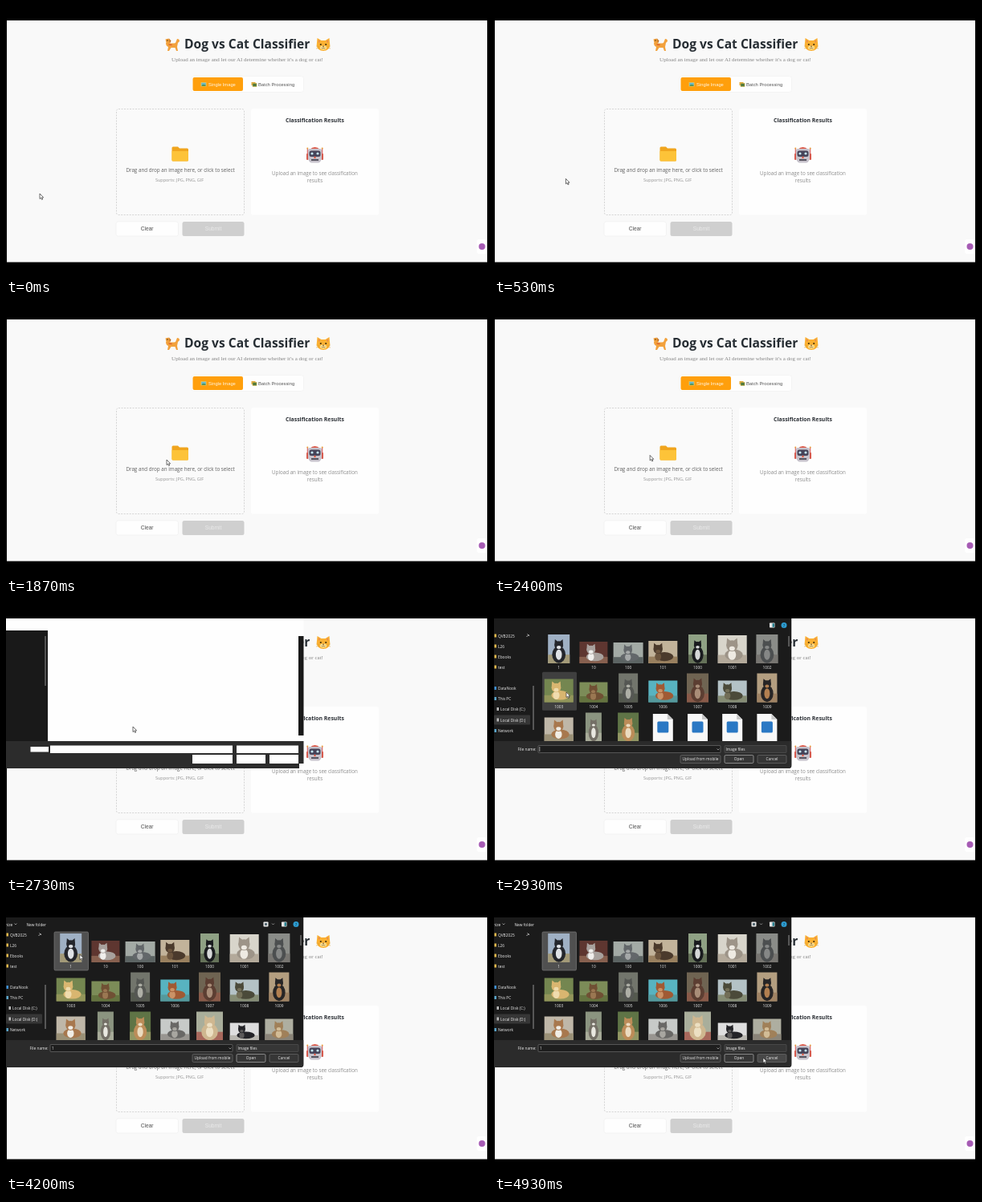
Write an HTML page that moves like this. It is 600 by 338 pixels and loops after 5 s.

```html
<!DOCTYPE html>
<html lang="en">
<head>
<meta charset="utf-8">
<title>Classifier demo</title>
<style>
html, body { margin: 0; width: 100%; height: 100%; overflow: hidden; background: #000; }
svg { display: block; width: 100vw; height: 100vh; }
text { font-family: "Open Sans", "Noto Sans", sans-serif; }
.arial { font-family: "Liberation Sans", Arial, sans-serif; }
.times { font-family: "Liberation Serif", Times, serif; }
.mid { text-anchor: middle; }
.bold { font-weight: 700; }
.ui { font-size: 4.8px; fill: #ececec; }
</style>
</head>
<body>
<svg id="stage" viewBox="0 0 600 338">
  <defs>
    <clipPath id="files"><rect x="52" y="33" width="312" height="138"/></clipPath>
    <clipPath id="dialogBox"><path d="M0 18H370.500V201q0 4-4 4H0z"/></clipPath>
  </defs>

  <rect width="600" height="338" fill="#000"/>
  <rect x="1" y="18" width="598" height="301.500" fill="#f9f9f9"/>

  <g id="page">
    <g id="dog" fill="#f2a13c">
      <path d="M202 46q6 1 9 0l2-5q3 0 3 3l-2 2-1 5 1 5h-2l-1.500-4h-5l-2.500 4h-2l1-5q-3-1-3-5z"/>
      <path d="M198.500 41.500l4-1 2 3-1 4-4-1.500z"/>
      <path d="M203 40.500l2.500 3-1.500 3z" fill="#b96b22"/>
      <circle cx="201" cy="43" r=".7" fill="#33230a"/>
      <path d="M202.500 48l4 .5" stroke="#d44a2c" stroke-width="1.200"/>
    </g>
    <text class="bold" x="222" y="53" font-size="15.600" fill="#262d33">Dog vs Cat Classifier</text>
    <g id="cat">
      <path d="M387.500 40l5 3h5l5-3 .8 9q-1 7-8.300 7t-8.300-7z" fill="#fbb133"/>
      <path d="M388.700 42l2.500 2-2 2zM401.300 42l-2.500 2 2 2z" fill="#e88a52"/>
      <circle cx="391.800" cy="48" r="1.100" fill="#42310d"/><circle cx="398.200" cy="48" r="1.100" fill="#42310d"/>
      <ellipse cx="395" cy="52" rx="4" ry="2.500" fill="#ffe598"/>
      <path d="M394 50h2l-1 1.200zM392.500 52.200q1.300 1.500 2.500 0 1.200 1.500 2.500 0" fill="none" stroke="#704514" stroke-width=".6"/>
      <path d="M386 50l4 .7M386 53l4-.8M404 50l-4 .7M404 53l-4-.8" stroke="#d69a24" stroke-width=".5"/>
    </g>
    <text class="times mid" x="300.500" y="68.500" font-size="7" fill="#858585">Upload an image and let our AI determine whether it's a dog or cat!</text>

    <rect x="231" y="87.500" width="139.500" height="20" rx="3" fill="#fefefe" stroke="#f0f0f0" stroke-width=".6"/>
    <rect x="232.500" y="89" width="62.500" height="17" rx="2" fill="#ff9f0c"/>
    <g id="picture">
      <rect x="242.500" y="95" width="7" height="5.500" rx=".6" fill="#e7c35a"/>
      <rect x="243.300" y="95.800" width="5.400" height="3.900" fill="#69b9c9"/>
      <path d="M243.300 99.700l2-2 1.500 1 1-1 .9 2z" fill="#4f8a3c"/>
    </g>
    <text class="arial" x="252" y="100" font-size="5.800" fill="#fff5e3">Single Image</text>
    <g id="pictures">
      <rect x="305.500" y="95" width="5" height="4" fill="#e0a83c"/>
      <rect x="307" y="96.500" width="5" height="4" fill="#4f7a3d" stroke="#d7b64d" stroke-width=".6"/>
    </g>
    <text class="arial" x="314" y="100" font-size="5.800" fill="#555">Batch Processing</text>

    <rect x="137.500" y="128.500" width="159" height="132" rx="2.500" fill="#fafafa" stroke="#ccc" stroke-width=".8" stroke-dasharray="2 1.500"/>
    <path d="M206.500 177q0-1.500 1.500-1.500h6l2 2h9.500q1.500 0 1.500 1.500v13q0 1.500-1.500 1.500h-17.500q-1.500 0-1.500-1.500z" fill="#f0a51e"/>
    <path d="M206.500 181h20.500v11q0 1.500-1.500 1.500h-17.500q-1.500 0-1.500-1.500z" fill="#fdc338"/>
    <text class="mid" x="217" y="207" font-size="6.280" fill="#606060">Drag and drop an image here, or click to select</text>
    <text class="mid" x="216" y="219" font-size="5.470" fill="#929292">Supports: JPG, PNG, GIF</text>

    <rect x="305" y="128" width="159" height="132.500" rx="2.500" fill="#fefefe"/>
    <text class="mid bold" x="384.500" y="144.500" font-size="6.900" fill="#2c3036">Classification Results</text>
    <g id="robot">
      <path d="M375.300 177.500v10M393.700 177.500v10" stroke="#d65a5a" stroke-width="1.100"/>
      <circle cx="375.300" cy="177.500" r="1" fill="#e8a13e"/><circle cx="393.700" cy="177.500" r="1" fill="#e8a13e"/>
      <rect x="374" y="184" width="2.500" height="8" rx="1" fill="#d65a4e"/><rect x="392.500" y="184" width="2.500" height="8" rx="1" fill="#d65a4e"/>
      <path d="M378 179q6.500-6 13 0z" fill="#dc5a4a"/>
      <path d="M376 180q0-2 2-2h13q2 0 2 2v9q-1 6-4 6.500h-9q-3-.5-4-6.500z" fill="#c6c2cb"/>
      <rect x="377.500" y="180.500" width="14" height="7.500" rx="2.500" fill="#464459"/>
      <circle cx="381" cy="184" r="1.600" fill="#c4e7f2"/><circle cx="388" cy="184" r="1.600" fill="#c4e7f2"/>
      <path d="M384.500 187l1.500 3h-3z" fill="#df4f38"/>
      <path d="M380 192h9" stroke="#55525e" stroke-width="2"/>
    </g>
    <g class="mid" font-size="6.230" fill="#8c8c8c">
      <text x="384.500" y="211">Upload an image to see classification</text>
      <text x="384.500" y="219.800">results</text>
    </g>

    <rect x="137" y="269" width="77.500" height="18" rx="2.500" fill="#fefefe" stroke="#ededed" stroke-width=".6"/>
    <text class="arial mid" x="175.700" y="280.200" font-size="6.600" fill="#505050">Clear</text>
    <rect x="219.500" y="269" width="77" height="18" rx="2.500" fill="#cfcfcf"/>
    <text class="arial mid" x="258" y="280.200" font-size="6.600" fill="#eaeaea">Submit</text>

    <path d="M599 291h-10q-3 0-3 3v12q0 3 3 3h10z" fill="#fff"/>
    <circle cx="592.500" cy="300" r="4" fill="#a65bb4"/>
  </g>

  <g id="blank">
    <path d="M0 18H370.500V199H365V205H0z" fill="#fefefe"/>
    <path d="M0 33H52V171H0zM364 40h6.500v124h-6.500z" fill="#191919"/>
    <path d="M0 171H370.500V199H365V205H0z" fill="#2c2c2c"/>
    <path d="M49 40v62" stroke="#8c8c8c" stroke-width="1"/>
    <path d="M30.500 178h22.500v6.500H30.500zM55 176.500h227v9.500H55zM287 176.500h77v9.500h-77zM232 188h50v11h-50zM287 188h36v11h-36zM328 188h36v11h-36z" fill="#fefefe"/>
  </g>

  <g id="dialog" clip-path="url(#dialogBox)">
    <rect x="0" y="18" width="370.500" height="187" fill="#1b1b1b"/>
    <rect x="0" y="171" width="370.500" height="34" fill="#2b2b2b"/>
    <g id="toolbar" class="ui">
      <text x="-1" y="28.500">nize</text>
      <path d="M10.500 25.500l1.500 1.500 1.500-1.500M331 25.500l1.500 1.500 1.500-1.500" fill="none" stroke="#d4d4d4" stroke-width=".6"/>
      <text x="25.500" y="28.500">New folder</text>
      <rect x="320.500" y="23.500" width="6" height="6" rx=".8" fill="#e8e8e8"/>
      <rect x="322" y="25" width="3" height="3" fill="#576a73"/>
    </g>
    <rect x="343" y="23.500" width="6.500" height="6" rx=".8" fill="#e6e6e6"/>
    <rect x="346.500" y="24.200" width="2.500" height="4.600" fill="#28808f"/>
    <circle cx="361" cy="26.500" r="3.500" fill="#2d9bd0"/>
    <text class="mid" x="361" y="28.500" font-size="5" fill="#103039">?</text>
    <rect x="0" y="138.500" width="45" height="12" rx="1" fill="#363636"/>
    <g id="places" class="ui"></g>
    <path d="M40.500 41l3-3M41.500 37.500l2.500 2.500" stroke="#c4c4c4" stroke-width=".9"/>
    <path d="M49 102v55M367 40v13" stroke="#949494" stroke-width="1"/>
    <g clip-path="url(#files)">
      <rect id="hover" width="43" height="48" rx="1.500" fill="#3f3f3f"/>
      <rect id="selected" x="60" y="36" width="42.500" height="48" rx="1.500" fill="#505050" stroke="#858585" stroke-width=".6"/>
      <g id="grid"></g>
    </g>
    <g class="ui">
      <text x="52.500" y="183" text-anchor="end">File name:</text>
      <rect x="55" y="176.500" width="227" height="9" rx="1" fill="#1e1e1e" stroke="#7a7a7a" stroke-width=".6"/>
      <path id="caret" d="M56.800 178v6" stroke="#f4f4f4" stroke-width=".6"/>
      <text id="fileName" x="57" y="183">1</text>
      <path d="M277.500 180.500l1.500 1.500 1.500-1.500M359.500 180.500l1.500 1.500 1.500-1.500" fill="none" stroke="#d4d4d4" stroke-width=".6"/>
      <rect x="287" y="176.500" width="77" height="9" rx="1" fill="#363636" stroke="#5a5a5a" stroke-width=".6"/>
      <text x="288.500" y="183">Image files</text>
      <g id="buttons" class="mid"></g>
    </g>
  </g>

  <g id="pointer" stroke="#303030" stroke-width=".7" stroke-linejoin="round" fill="#fff">
    <path id="arrow" d="M0 0v6.500l1.600-1.300 1 2.300 1.100-.5-1-2.200H4.600z"/>
    <path id="hand" d="M-.8.500q.8-1 1.500 0v2.700l2.300.7q.8.300.6 1.200l-.6 2.900h-3.500l-2.200-3q.3-1 1.100-.3l.8.700z"/>
  </g>
</svg>

<script>
const LOOP = 5000;
const NS = "http://www.w3.org/2000/svg";
const $ = id => document.getElementById(id);

function add(parent, tag, attrs, text) {
  const node = document.createElementNS(NS, tag);
  for (const key in attrs) node.setAttribute(key, attrs[key]);
  if (text !== undefined) node.textContent = text;
  parent.appendChild(node);
  return node;
}
const show = (id, on) => $(id).setAttribute("visibility", on ? "inherit" : "hidden");

// Sidebar: label, x, baseline, icon colour
[["QVB2025", 5, 41.500, "#e3b94c"], ["L26", 5, 54.500, "#e3b94c"], ["Ebooks", 5, 67.500, "#e3b94c"],
 ["test", 5, 80.500, "#e3b94c"], ["DataNook", 5, 107, "#3f91d4"], ["This PC", 5, 120, "#5ba6cb"],
 ["Local Disk (C:)", 8, 133, "#bbb"], ["Local Disk (D:)", 8, 146.500, "#bbb"], ["Network", 5, 160, "#5ba6cb"]
].forEach(([label, x, y, fill]) => {
  add($("places"), "rect", { x: x - 4.500, y: y - 4, width: 2.500, height: 4, fill });
  add($("places"), "text", { x, y }, label);
});

// Dialog buttons: id, label, x, width, border colour
[["upload", "Upload from mobile", 232, 50, "#777"], ["open", "Open", 287, 36, "#c4c4c4"], ["cancel", "Cancel", 328, 36, "#777"]
].forEach(([id, label, x, width, stroke]) => {
  add($("buttons"), "rect", { id, x, y: 188.500, width, height: 10, rx: 1.500, fill: "#363636", stroke, "stroke-width": .6 });
  add($("buttons"), "text", { x: x + width / 2, y: 195.300 }, label);
});

// Thumbnails: width, height, backdrop, floor, fur, chest
const pets = [
  [27, 36, "#9fb0c4", "#a39a78", "#24262c", "#dfe2e6"], [35, 27, "#5e3630", "#87604f", "#a8a19d", "#f0eeec"],
  [37, 26, "#a3aaa5", "#5c6463", "#63676a", "#a5a8a8"], [36, 28, "#c2b39a", "#99805f", "#4b3a2c", "#6b543d"],
  [23, 36, "#8fa184", "#657259", "#191b1e", "#d6d8d8"], [36, 35, "#d8d5cb", "#b3a99a", "#9d9488", "#eeeae2"],
  [27, 36, "#8a8c88", "#777571", "#4c4f50", "#858786"],
  [36, 29, "#748650", "#92955a", "#d9b670", "#efdcae"], [35, 25, "#7c8c58", "#64733f", "#705034", "#9a7752"],
  [24, 36, "#72756c", "#54594e", "#555753", "#aeafa6"], [36, 27, "#58b3c0", "#55999c", "#a05a34", "#cb9266"],
  [27, 36, "#6f6452", "#895a49", "#5c3e32", "#a98d78"], [36, 27, "#b4c2c6", "#858c74", "#4b4a3a", "#726e57"],
  [25, 36, "#b39e80", "#a08364", "#272526", "#b27f50"],
  [36, 30, "#bfb7a8", "#9a9076", "#a8784e", "#f0ede6"], [20, 36, "#8b9480", "#a7aa98", "#746f66", "#e9e7e0"],
  [26, 36, "#5f7446", "#929663", "#bc8c58", "#ebdcc0"], [36, 27, "#c7cac8", "#989590", "#696866", "#a8a6a0"],
  [33, 36, "#a9ae9b", "#a8685c", "#cfb790", "#ecdfc2"], [36, 22, "#dedede", "#b9b7b0", "#242428", "#5c5a5a"],
  [35, 27, "#aeaea0", "#8a8478", "#a08059", "#d2bc96"]
];
const labels = [1, 10, 100, 101, ...Array.from({ length: 10 }, (_, i) => 1000 + i)];
const PITCH = 43.200;
const rowBottom = [74, 122.500, 171.500];

function drawPet(parent, cx, bottom, [w, h, back, floor, fur, chest], i) {
  const g = add(parent, "g", { transform: `translate(${cx - w / 2} ${bottom - h})` });
  const wide = w > h;
  const hx = w * (wide ? .33 + .08 * (i % 3) : .5), hy = h * .38, r = Math.min(w, h) * .2;
  add(g, "rect", { width: w, height: h, fill: back });
  add(g, "rect", { y: h * .7, width: w, height: h * .3, fill: floor });
  add(g, "ellipse", { cx: wide ? w * .55 : hx, cy: h * .7, rx: w * .31, ry: h * (wide ? .2 : .29), fill: fur });
  add(g, "ellipse", { cx: hx, cy: h * .7, rx: r * .7, ry: h * .18, fill: chest });
  add(g, "path", { d: `M${hx - r} ${hy}l${r * .1} ${-r * 1.400} ${r * .9} ${r * .7} ${r * .9} ${-r * .7} ${r * .1} ${r * 1.400}z`, fill: fur });
  add(g, "circle", { cx: hx, cy: hy, r, fill: fur });
  add(g, "ellipse", { cx: hx, cy: hy + r * .45, rx: r * .5, ry: r * .4, fill: chest });
}

function drawPlaceholder(parent, cx) {
  add(parent, "path", { d: `M${cx - 12.500} 137h18l7 7v28h-25z`, fill: "#f8f8f8" });
  add(parent, "path", { d: `M${cx + 5.500} 137v7h7z`, fill: "#c8c8c8" });
  add(parent, "rect", { x: cx - 7, y: 146.500, width: 14, height: 14, rx: 1.500, fill: "#2a78c4" });
}

const loaded = add($("grid"), "g", { id: "loaded" });
const pending = add($("grid"), "g", { id: "pending" });
pets.forEach((pet, i) => {
  const col = i % 7, row = Math.floor(i / 7), cx = 80.700 + col * PITCH;
  const late = i > 16;
  drawPet(late ? loaded : $("grid"), cx, rowBottom[row], pet, i);
  if (late) drawPlaceholder(pending, cx);
  if (i < labels.length) add($("grid"), "text", { class: "ui mid", x: cx, y: rowBottom[row] + 7 }, labels[i]);
});

// Pointer path: time, x, y
const path = [
  [0, 42, 234], [300, 42, 234], [1000, 228, 161], [1130, 228, 161], [1700, 200, 193], [2300, 200, 193],
  [2730, 158, 153], [2930, 90, 110], [3150, 92, 106], [3470, 104, 69], [3800, 84, 60], [4130, 84, 60],
  [4800, 335, 193], [LOOP, 335, 193]
];
function pointerAt(t) {
  const k = path.findIndex((p, i) => i && t <= p[0]);
  const [t0, x0, y0] = path[k - 1], [t1, x1, y1] = path[k];
  const u = (t - t0) / (t1 - t0), e = u * u * (3 - 2 * u);
  return [x0 + (x1 - x0) * e, y0 + (y1 - y0) * e];
}

const BLANK_AT = 2600, READY_AT = 2800, LOADED_AT = 3060, PICK_AT = 3930;

function render(t) {
  const [x, y] = pointerAt(t);
  const ready = t >= READY_AT, complete = t >= LOADED_AT, picked = t >= PICK_AT;
  show("blank", t >= BLANK_AT && !ready);
  show("dialog", ready);
  show("toolbar", complete);
  show("loaded", complete);
  show("pending", !complete);
  show("caret", !complete);
  show("selected", picked);
  show("fileName", picked);

  const col = Math.floor((x - 60) / PITCH), row = Math.floor((y - 36) / 48.700);
  const overTile = col >= 0 && col < 7 && row >= 0 && y < 171;
  show("hover", overTile && !(picked && col === 0 && row === 0));
  $("hover").setAttribute("x", 60 + col * PITCH);
  $("hover").setAttribute("y", 36 + row * 48.700);
  $("cancel").setAttribute("fill", x >= 328 && y >= 188 ? "#484848" : "#363636");

  const overDrop = t < 1600 && x > 137 && x < 297 && y > 128 && y < 261;
  show("hand", overDrop);
  show("arrow", !overDrop);
  $("pointer").setAttribute("transform", `translate(${x} ${y})`);
}

const start = performance.now();
function tick() {
  render((performance.now() - start) % LOOP);
  requestAnimationFrame(tick);
}
tick();
</script>
</body>
</html>
```
